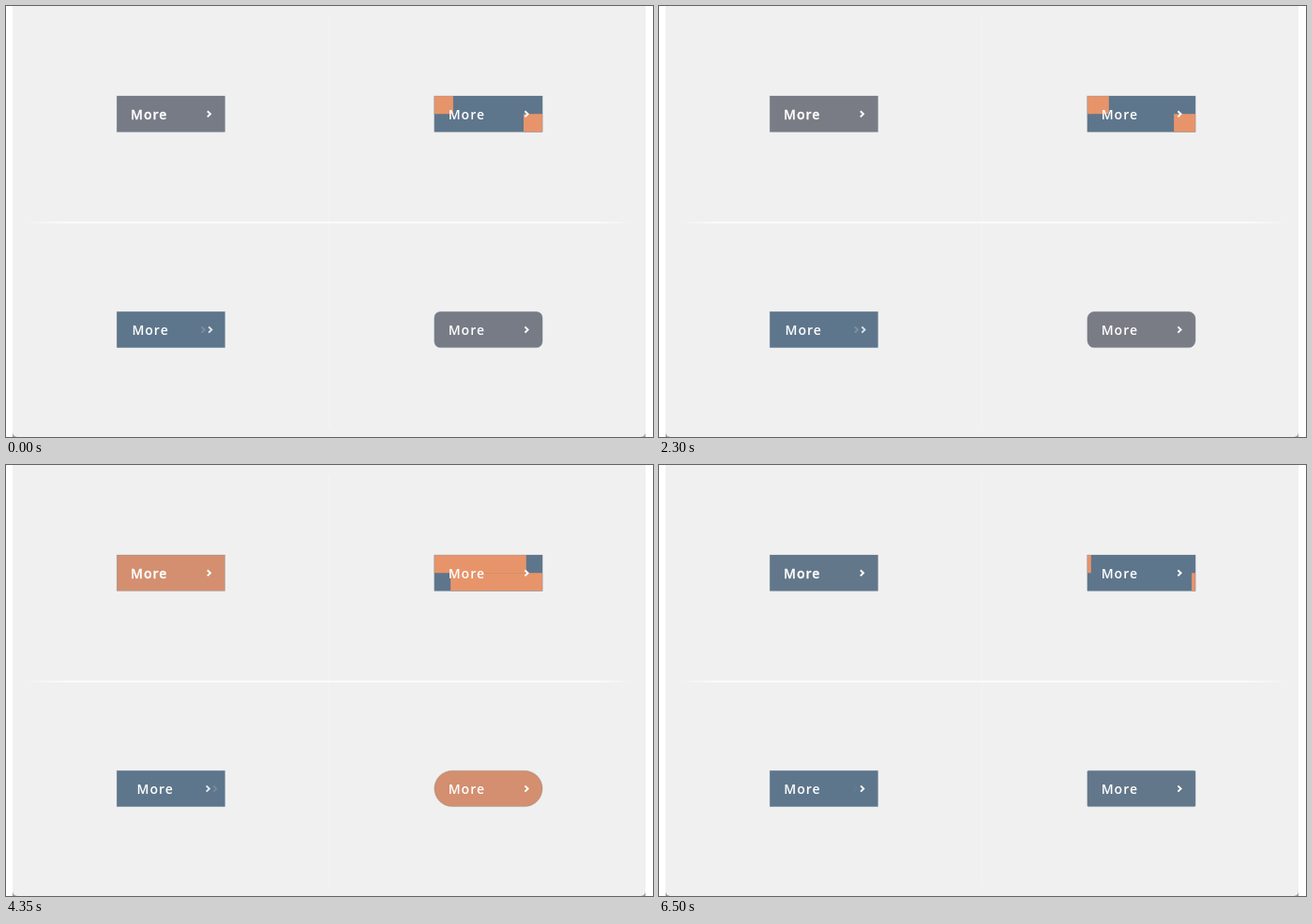
An HTML page for the animation above (6550 ms loop, 690x460 px).

```html
<!DOCTYPE html>
<html lang="en">
<head>
<meta charset="utf-8">
<title>Button hover effects</title>
<style>
  html, body { margin: 0; width: 100%; height: 100%; overflow: hidden; background: #fff; }
  svg { display: block; width: 690px; height: 460px; }
  text { font: 600 14px "Open Sans", "Noto Sans", sans-serif; letter-spacing: 1px; fill: #fff; }
  .chevron { fill: none; stroke: #fff; stroke-width: 1.9; }
  .edge { fill: none; stroke: #5e768c; stroke-width: .6; stroke-opacity: .4; }
  .strong text { stroke: #fff; stroke-width: .3; }
</style>
</head>
<body>
<svg viewBox="0 0 690 460">
  <defs>
    <linearGradient id="fade">
      <stop offset="0" stop-color="#fff" stop-opacity="0"/>
      <stop offset=".06" stop-color="#fff" stop-opacity=".85"/>
      <stop offset=".94" stop-color="#fff" stop-opacity=".85"/>
      <stop offset="1" stop-color="#fff" stop-opacity="0"/>
    </linearGradient>
  </defs>
  <rect x="7" y="454" width="675" height="6" fill="#9c9c9c"/>
  <rect x="7" y="-10" width="675" height="470" rx="5" fill="#f0f0f0"/>
  <rect x="20" y="230.3" width="650" height="1.6" fill="url(#fade)"/>
  <rect x="344" y="10" width="1" height="440" fill="#fff" opacity=".2"/>
  <g id="buttons"></g>
</svg>
<script>
const LOOP = 6550, STEP = 50, DURATION = 1000;
const W = 115.3, H = 38.4, SHIFT = 7.5, ROUND = 37.5;
const BLUE = [94, 118, 140], ORANGE = [232, 148, 106];

// Start time of each transition and the state it leads to.
const TURNS = [[-352, 1], [1668, 0], [3685, 1], [5706, 0]];

const rgb = c => `rgb(${c.map(Math.round)})`;
const mix = p => rgb(BLUE.map((v, i) => v + (ORANGE[i] - v) * p));
const easeInOutCubic = x => x < .5 ? 4 * x ** 3 : 1 - 4 * (1 - x) ** 3;

function add(parent, tag, attrs = {}) {
  const el = document.createElementNS("http://www.w3.org/2000/svg", tag);
  set(el, attrs);
  parent.append(el);
  return el;
}

function set(el, attrs) {
  for (const name in attrs) el.setAttribute(name, attrs[name]);
}

function addChevron(parent) {
  return add(parent, "path", { class: "chevron", d: "M96.6 16.2L99.8 19.3L96.6 22.4" });
}

function addButton(x, y, withPanels) {
  const group = add(document.getElementById("buttons"), "g", { transform: `translate(${x} ${y})` });
  const base = add(group, "rect", { width: W, height: H, fill: rgb(BLUE) });
  const panels = withPanels
    ? [0, 1].map(row => add(group, "rect", { y: row * H / 2, height: H / 2, fill: rgb(ORANGE) }))
    : [];
  const edge = add(group, "rect", { class: "edge", width: W, height: H });
  const label = add(group, "text", { x: 14.9, y: 24.6 });
  label.textContent = "More";
  return { group, base, panels, edge, label, chevron: addChevron(group) };
}

const fading = addButton(118.2, 96);
const split = addButton(456.8, 96, true);
const sliding = addButton(118.2, 326.2);
const rounding = addButton(456.8, 326.2);
const incoming = addChevron(sliding.group);
fading.group.classList.add("strong");

function progressAt(time) {
  const [start, goal] = TURNS.findLast(([begin]) => begin <= time);
  const p = easeInOutCubic(Math.min((time - start) / DURATION, 1));
  return goal ? p : 1 - p;
}

function draw(p) {
  set(fading.base, { fill: mix(p) });

  const [top, bottom] = split.panels;
  set(top, { width: W * p });
  set(bottom, { x: W * (1 - p), width: W * p });

  set(sliding.label, { transform: `translate(${SHIFT * p} 0)` });
  set(sliding.chevron, { transform: `translate(${SHIFT * p} 0)`, opacity: 1 - p });
  set(incoming, { transform: `translate(${SHIFT * (p - 1)} 0)`, opacity: p });

  const rx = Math.min(ROUND * p, H / 2);
  set(rounding.base, { rx, fill: mix(p) });
  set(rounding.edge, { rx });
}

function tick() {
  const time = performance.now() % LOOP;
  draw(progressAt(Math.floor(time / STEP) * STEP));
  requestAnimationFrame(tick);
}
tick();
</script>
</body>
</html>
```
